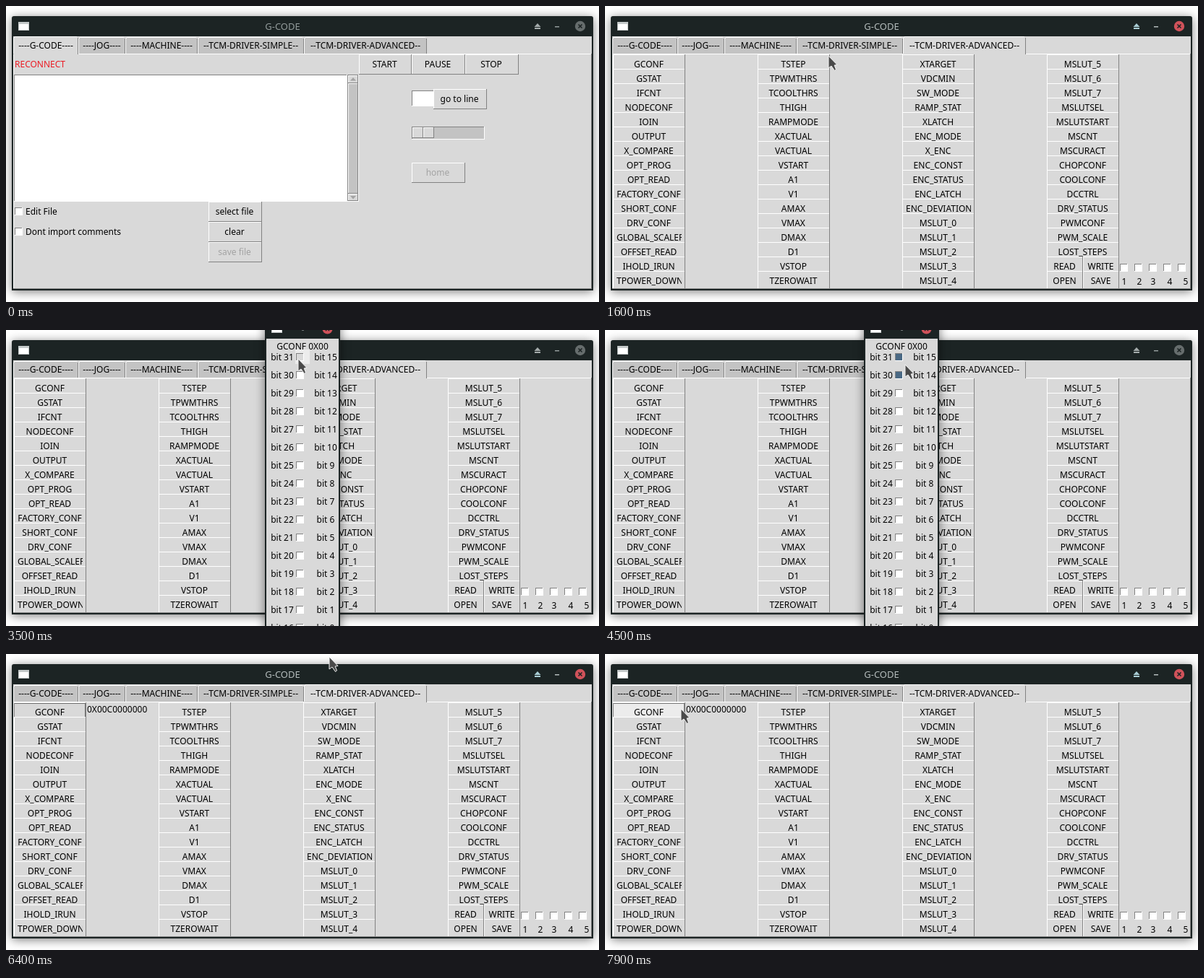
An HTML page with a canvas that plays this animation: 820 by 410 pixels, repeating every 8 s.

```html
<!DOCTYPE html>
<html lang="en">
<head>
<meta charset="utf-8">
<title>G-CODE</title>
<style>
html, body { margin: 0; width: 100%; height: 100%; overflow: hidden; background: #fff; }
canvas { display: block; }
</style>
</head>
<body>
<canvas id="stage" width="820" height="410"></canvas>
<script>
const ctx = document.getElementById('stage').getContext('2d');
const LOOP = 8000, STEP = 100;
const FACE = '#d9d9d9', TROUGH = '#c3c3c3', HOVER = '#ececec';
const DARK = '#828282', FRAME = '#1c2424', GREY = '#a3a3a3', CHECKED = '#4a6984';

const TABS = [
  ['----G-CODE----', 10, 90], ['----JOG----', 100, 65], ['----MACHINE----', 165, 100],
  ['--TCM-DRIVER-SIMPLE--', 265, 147], ['--TCM-DRIVER-ADVANCED--', 412, 170]
];
const REGISTERS = [
  'GCONF GSTAT IFCNT NODECONF IOIN OUTPUT X_COMPARE OPT_PROG OPT_READ FACTORY_CONF SHORT_CONF DRV_CONF GLOBAL_SCALER OFFSET_READ IHOLD_IRUN TPOWER_DOWN',
  'TSTEP TPWMTHRS TCOOLTHRS THIGH RAMPMODE XACTUAL VACTUAL VSTART A1 V1 AMAX VMAX DMAX D1 VSTOP TZEROWAIT',
  'XTARGET VDCMIN SW_MODE RAMP_STAT XLATCH ENC_MODE X_ENC ENC_CONST ENC_STATUS ENC_LATCH ENC_DEVIATION MSLUT_0 MSLUT_1 MSLUT_2 MSLUT_3 MSLUT_4',
  'MSLUT_5 MSLUT_6 MSLUT_7 MSLUTSEL MSLUTSTART MSCNT MSCURACT CHOPCONF COOLCONF DCCTRL DRV_STATUS PWMCONF PWM_SCALE LOST_STEPS'
].map(s => s.split(' '));

// Pointer path: time, x, y
const PATH = [
  [400, 543, 2], [900, 467, 53], [1300, 467, 53], [1900, 150, 84], [2200, 84, 79],
  [2600, 83, 79], [3200, 404, 39], [3500, 404, 40], [3600, 404, 40], [3900, 404, 62],
  [4200, 404, 63], [5100, 447, 6], [5200, 447, 5], [5300, 447, 5], [5400, 447, 4],
  [6500, 447, 4], [7400, 136, 84], [7500, 136, 84], [7900, 105, 76], [8000, 105, 76]
];

function pointer(t) {
  const i = PATH.findIndex(p => p[0] > t);
  if (i < 1) return null;
  const [t0, x0, y0] = PATH[i - 1], [t1, x1, y1] = PATH[i];
  const u = (t - t0) / (t1 - t0), e = u * u * (3 - 2 * u);
  return { x: Math.round(x0 + (x1 - x0) * e), y: Math.round(y0 + (y1 - y0) * e) };
}

const inside = (p, x, y, w, h) => !!p && p.x >= x && p.x < x + w && p.y >= y && p.y < y + h;

function rect(x, y, w, h, color) {
  ctx.fillStyle = color;
  ctx.fillRect(x, y, w, h);
}

function text(s, x, y, align = 'left', color = '#000', size = 12, weight = 500) {
  ctx.font = `${weight} ${size}px "Noto Sans", sans-serif`;
  ctx.textAlign = align;
  ctx.fillStyle = color;
  ctx.fillText(s, x, y);
}

function bevel(x, y, w, h, fill, sunken) {
  rect(x, y, w, h, sunken ? '#fff' : DARK);
  rect(x, y, w - 1, h - 1, sunken ? DARK : '#fff');
  rect(x + 1, y + 1, w - 2, h - 2, fill);
}

function button(label, x, y, w, disabled) {
  bevel(x, y, w, 28, FACE);
  text(label, x + w / 2 - 1, y + 18, 'center', disabled ? GREY : '#000');
}

function checkbox(x, y, fill = '#fff') {
  bevel(x, y, 11, 11, fill, true);
}

function polygon(points, color) {
  ctx.beginPath();
  points.forEach(([x, y]) => ctx.lineTo(x, y));
  ctx.closePath();
  ctx.fillStyle = color;
  ctx.fill();
}

function frame(x, y, w, h) {
  ctx.save();
  ctx.shadowColor = 'rgba(0,0,0,.5)';
  ctx.shadowBlur = 14;
  ctx.shadowOffsetY = 2;
  ctx.fillStyle = FRAME;
  ctx.beginPath();
  ctx.roundRect(x, y, w, h, [3, 3, 0, 0]);
  ctx.fill();
  ctx.restore();
}

function windowIcon(x, y) {
  rect(x, y, 15, 12, '#c4c9c9');
  rect(x + 1, y + 3, 13, 8, '#fff');
}

function closeButton(x, y, r, color) {
  ctx.fillStyle = color;
  ctx.beginPath();
  ctx.arc(x, y, r, 0, 2 * Math.PI);
  ctx.fill();
  ctx.strokeStyle = FRAME;
  ctx.lineWidth = 1.6;
  ctx.beginPath();
  for (const d of [-2.5, 2.5]) {
    ctx.moveTo(x - 2.5, y - d);
    ctx.lineTo(x + 2.5, y + d);
  }
  ctx.stroke();
}

function mainWindow(active, tab) {
  frame(8, 14, 804, 380);
  rect(10, 42, 800, 350, FACE);
  windowIcon(17, 22);
  text('G-CODE', 382.5, 33, 'center', active ? '#b4bcbc' : '#939c9c', 13, 400);
  const tint = active ? '#a9cdd4' : '#a4abab';
  polygon([[730.5, 29], [735, 24], [739.5, 29]], tint);
  rect(731, 30, 8, 2, tint);
  rect(759, 28, 6, 1.5, active ? '#b4bcbc' : '#939c9c');
  closeButton(794, 28, 7.2, active ? '#d0525a' : '#666d6d');

  rect(10, 66, 800, 1, '#fff');
  rect(10, 66, 1, 325, '#fff');
  rect(809, 66, 1, 326, DARK);
  rect(10, 391, 800, 1, DARK);
  TABS.forEach(([label, x, w], i) => {
    const on = i === tab, top = on ? 42 : 43, fill = on ? FACE : TROUGH;
    rect(x, top + 2, w, 66 - top - 2 + on, fill);
    rect(x + 2, top, w - 4, 2, fill);
    rect(x + 2, top, w - 4, 1, '#fff');
    rect(x + 1, top + 1, 1, 1, '#fff');
    rect(x, top + 2, 1, 64 - top, '#fff');
    rect(x + w - 1, top + 2, 1, 64 - top + on, DARK);
    text(label, x + w / 2, 59, 'center');
  });
}

function codePage() {
  text('RECONNECT', 12, 85, 'left', '#ec1c24');
  button('START', 488, 67, 73);
  button('PAUSE', 561, 67, 74);
  button('STOP', 635, 67, 74);
  bevel(11, 95, 461, 176, '#fff', true);

  bevel(472, 95, 16, 176, TROUGH, true);
  bevel(473, 96, 14, 11, FACE);
  bevel(473, 107, 14, 153, TROUGH);
  bevel(473, 260, 14, 10, FACE);
  polygon([[476, 103.5], [480, 99], [484, 103.5]], GREY);
  polygon([[476, 263], [480, 267.5], [484, 263]], GREY);

  bevel(561, 117, 32, 22, '#fff', true);
  button('go to line', 591, 115, 74);
  bevel(561, 167, 101, 18, TROUGH, true);
  bevel(562, 168, 15, 15, FACE);
  bevel(577, 168, 15, 15, FACE);
  button('home', 561, 217, 74, true);

  ['Edit File', 'Dont import comments'].forEach((label, i) => {
    checkbox(12, 279 + 28 * i);
    text(label, 27, 289 + 28 * i);
  });
  ['select file', 'clear', 'save file'].forEach((label, i) =>
    button(label, 280, 271 + 28 * i, 74, i === 2));
}

// Each cell is a tall button whose lower part is covered by the next row.
function cell(label, x, y, w, state = {}) {
  const h = Math.min(28, 391 - y), push = state.pressed ? 1 : 0;
  rect(x, y, w, h, state.hover ? HOVER : FACE);
  rect(x, y, w, 1, '#fff');
  rect(x, y, 1, h, '#fff');
  rect(x + w - 1, y, 1, h, push ? '#fff' : DARK);
  ctx.save();
  ctx.beginPath();
  ctx.rect(x + 4, y, w - 9, h);
  ctx.clip();
  ctx.font = '500 12px "Noto Sans", sans-serif';
  const left = Math.max(x + 5, x + (w - 1 - ctx.measureText(label).width) / 2);
  text(label, left + push, y + 18 + push);
  ctx.restore();
  if (state.focus) {
    ctx.strokeStyle = '#000';
    ctx.lineWidth = 1;
    ctx.setLineDash([1, 1]);
    ctx.strokeRect(x + 0.5, y + 1.5, w - 2, 26);
    ctx.setLineDash([]);
  }
}

function registerPage(first, value) {
  REGISTERS.forEach((names, c) => names.forEach((name, r) =>
    cell(name, 11 + 200 * c, 67 + 20 * r, 100, c + r ? {} : first)));
  cell('READ', 611, 347, 50);
  cell('WRITE', 661, 347, 50);
  cell('OPEN', 611, 367, 50);
  cell('SAVE', 661, 367, 50);
  [718, 739, 758, 781, 803].forEach((x, i) => {
    checkbox(712 + 20 * i, 357);
    text(i + 1, x, 386, 'center');
  });
  if (value) text(value, 112, 81);
}

function popup(t, p) {
  frame(358, -30, 104, 460);
  rect(360, 12, 100, 398, FACE);
  windowIcon(367, -8);
  rect(409, 0, 3, 1, '#6f7777');
  const over = inside(p, 434, 0, 21, 9);
  closeButton(444.5, -1.5, over ? 9.5 : 7, t >= 6200 ? '#b8434a' : over ? '#ee353f' : '#d0525a');
  text('GCONF 0X00', 410, 27, 'center');
  const pressTimes = [[3400, 3600], [4000, 4100]];
  for (let i = 0; i < 16; i++) {
    const y = 32 + 25 * i;
    if (inside(p, 400, y - 5, 21, 20)) rect(400, y - 5, 20, 20, HOVER);
    const [down, up] = pressTimes[i] || [Infinity, Infinity];
    checkbox(401, y, t >= up ? CHECKED : t >= down ? FACE : '#fff');
    text('bit ' + (31 - i), 382, y + 10, 'center');
    text('bit ' + (15 - i), 442, y + 10, 'center');
  }
}

function arrow({ x, y }) {
  ctx.save();
  ctx.translate(x, y);
  ctx.lineJoin = 'round';
  polygon([[0, 0], [0, 17], [4, 14], [8.5, 20.5], [10.5, 19], [8.2, 13], [12, 12.5]], '#4a4a4a');
  ctx.strokeStyle = '#f4f4f4';
  ctx.lineWidth = 1;
  ctx.stroke();
  ctx.restore();
}

function draw(now) {
  const t = Math.floor(now % LOOP / STEP) * STEP;
  const p = pointer(t), open = t >= 2500 && t < 6400;
  rect(0, 0, 820, 410, '#fff');
  mainWindow(t >= 1100 && !open, t < 1100 ? 0 : 4);
  if (t < 1100) codePage();
  else if (t >= 1200) {
    registerPage({
      hover: inside(p, 11, 67, 100, 20),
      pressed: t >= 2300 && t < 2500,
      focus: t >= 2300 && !open
    }, t >= 6400 && '0X00C0000000');
  }
  if (open) popup(t, p);
  if (p) arrow(p);
  requestAnimationFrame(() => draw(performance.now()));
}

draw(performance.now());
</script>
</body>
</html>
```
